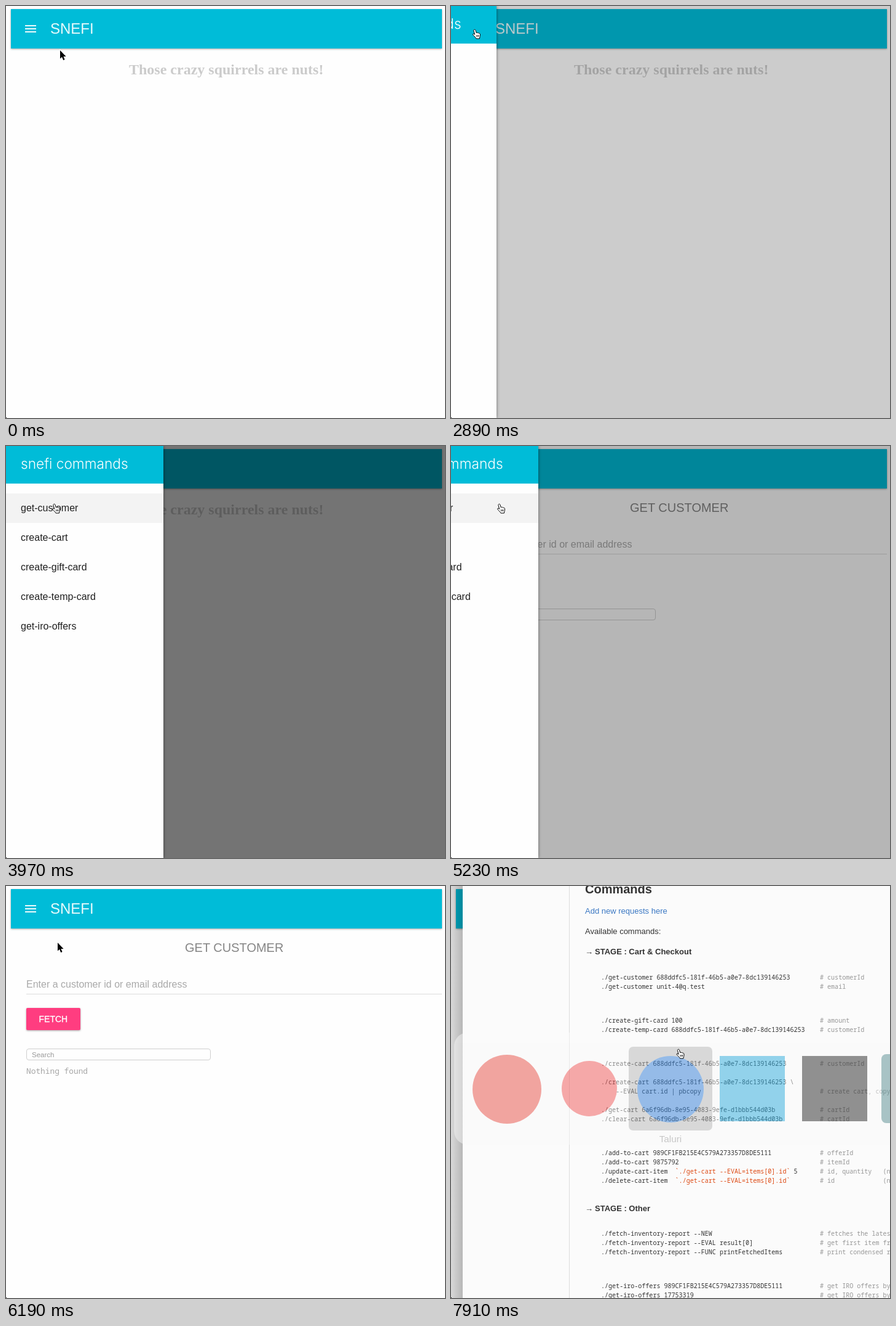
An HTML page for the animation above (8 s loop, 714 by 669 pixels).

```html
<!DOCTYPE html>
<html lang="en">
<head>
<meta charset="utf-8">
<title>Command menu</title>
<style>
  html, body { margin: 0; width: 100%; height: 100%; overflow: hidden; background: #fefefe; }
  svg { display: block; width: 714px; height: 669px; }
  text { white-space: pre; font-family: "Liberation Sans", Arial, sans-serif; }
  .serif { font-family: "Liberation Serif", Times, serif; font-weight: bold; }
  .light { font-family: Inter, sans-serif; font-weight: 300; }
  .mono { font-family: "Noto Sans Mono", monospace; }
  .bold { font-weight: bold; }
  .bar { filter: drop-shadow(0 1px 1.5px rgba(0,0,0,.35)); }
  .side { filter: drop-shadow(0 0 2.5px rgba(0,0,0,.5)); }
</style>
</head>
<body>
<svg id="stage" viewBox="0 0 714 669"></svg>
<script>
const LOOP = 8000, TEAL = '#00bcd8', DRAWER = 256;

const rect = (x, y, w, h, fill, more = '') =>
  `<rect x="${x}" y="${y}" width="${w}" height="${h}" fill="${fill}" ${more}/>`;
const circle = (x, y, r, fill) => `<circle cx="${x}" cy="${y}" r="${r}" fill="${fill}"/>`;
const text = (x, y, size, fill, str, cls = '', more = '') =>
  `<text x="${x}" y="${y}" font-size="${size}" fill="${fill}" class="${cls}" ${more}>${str}</text>`;
const group = (id, body) => `<g id="${id}">${body}</g>`;

const header = rect(8, 5, 701, 64, TEAL, 'class="bar"') +
  [31, 36, 41].map(y => rect(31, y, 18, 2, '#e9fafc')).join('') +
  text(72, 45, 24, '#e9fafc', 'SNEFI');

const home = text(200, 111, 24, '#cbcbcb', 'Those crazy squirrels are nuts!', 'serif');

const form =
  text(291, 107, 20, '#868686', 'GET CUSTOMER') +
  text(33, 165, 16, '#a9a9a9', 'Enter a customer id or email address') +
  rect(33, 175, 676, 1, '#dcdcdc') +
  rect(33, 198, 88, 36, '#ff3d80', 'rx="2" class="bar"') +
  text(53.5, 221, 14, '#fff', 'FETCH', '', 'stroke="#fff" stroke-width=".35"') +
  rect(33.5, 264.5, 299, 18, 'none', 'rx="3.5" stroke="#cfcfcf"') +
  text(42, 278, 11.5, '#999', 'Search') +
  text(33, 305, 12.83, '#a6a6a6', 'Nothing found', 'mono', 'font-weight="500"');

const commands = ['get-customer', 'create-cart', 'create-gift-card', 'create-temp-card', 'get-iro-offers'];
const drawer = rect(0, 0, DRAWER, 669, '#fefefe', 'class="side"') +
  rect(0, 0, DRAWER, 61, TEAL) +
  text(24, 37, 22.7, '#fff', 'snefi commands', 'light') +
  rect(0, 77, DRAWER, 48, '#f3f3f3', 'id="hover"') +
  commands.map((c, i) => text(24, 106 + 48 * i, 16, '#212121', c)).join('');

const customer = '688ddfc5-181f-46b5-a0e7-8dc139146253';
const cart = '6a6f96db-8e95-4083-9efe-d1bbb544d03b';
const offer = '989CF1FB215E4C579A273357D8DE5111';
const item = '<tspan fill="#dd4a14">`./get-cart --EVAL=items[0].id`</tspan>';
const listing = [
  [152, `./get-customer ${customer}`, 'customerId'],
  [167, './get-customer unit-4@q.test', 'email'],
  [222, './create-gift-card 100', 'amount'],
  [237, `./create-temp-card ${customer}`, 'customerId'],
  [292, `./create-cart ${customer}`, 'customerId'],
  [322, `./create-cart ${customer} \\`, ''],
  [337, '    --EVAL cart.id | pbcopy', 'create cart, copy id'],
  [367, `./get-cart ${cart}`, 'cartId'],
  [382, `./clear-cart ${cart}`, 'cartId'],
  [437, `./add-to-cart ${offer}`, 'offerId'],
  [452, './add-to-cart 9875792', 'itemId'],
  [467, `./update-cart-item  ${item} 5`, 'id, quantity   (note'],
  [482, `./delete-cart-item  ${item}`, 'id             (note'],
  [568, './fetch-inventory-report --NEW', 'fetches the latest'],
  [583, './fetch-inventory-report --EVAL result[0]', 'get first item from'],
  [598, './fetch-inventory-report --FUNC printFetchedItems', 'print condensed report'],
  [653, `./get-iro-offers ${offer}`, 'get IRO offers by'],
  [668, './get-iro-offers 17753319', 'get IRO offers by']
];
const stage = (y, name) => text(218, y, 13, '#333', '→') + text(234, y, 13, '#333', 'STAGE : ' + name, 'bold');
const docs =
  `<linearGradient id="shade"><stop stop-opacity=".15"/><stop offset="1" stop-opacity=".28"/></linearGradient>` +
  rect(0, 0, 19, 669, 'url(#shade)', 'id="shadow"') +
  rect(19, 0, 695, 669, '#fbfbfb') +
  rect(192, 0, 1, 669, '#dcdcdc') +
  text(218, 12, 20, '#333', 'Commands', 'bold') +
  text(218, 45, 13, '#3b78c3', 'Add new requests here') +
  text(218, 78, 13, '#333', 'Available commands:') +
  stage(111, 'Cart &amp; Checkout') + stage(528, 'Other') +
  listing.map(([y, code, note]) => text(244, y, 10.06, '#333', code, 'mono') +
    (note && text(600, y, 10.06, '#979797', '# ' + note, 'mono'))).join('');

const switcher =
  rect(5, 238, 760, 182, '#fafafa', 'rx="22" fill-opacity=".85"') +
  rect(0, 261, 136, 136, '#000', 'id="pick" rx="7" fill-opacity=".25"') +
  text(0, 416, 15.3, '#999', '', '', 'id="label" text-anchor="middle"') +
  circle(91, 330, 56, '#e9584f') +
  circle(225, 329, 45, '#f06060') +
  circle(357, 330, 54, '#3b84d8') +
  rect(437, 276, 106, 106, '#36aede') +
  rect(571, 276, 106, 106, '#333') +
  rect(700, 273, 112, 112, '#5f9296', 'rx="8"');

const arrow = `<path d="M0 0V13.6L3 10.8L5.2 16L7.6 15L5.4 10H9.6Z" stroke="#fff" stroke-width="1.6" paint-order="stroke"/>`;
const hand = `<g transform="translate(-4 -1)" stroke="#000" fill="#fff">
  <path d="M3.2 1.5c1-.8 2 0 2.3 1l1.2 4.2c.6-.8 1.8-.6 2.2.2.7-.6 1.8-.3 2.1.5.9-.3 1.8.2 1.9 1.2.1 2 .2 3.4-.6 5.2l-.4 2.2H6.6C5.5 14 3.5 12.2 1.6 10.2.4 9 1.4 7.8 2.8 8.3l1.4 1L2.5 3.4c-.3-.9 0-1.6.7-1.9z"/>
  <path d="M6.8 10.2l.5 3M8.7 10l.4 3M10.5 10l.2 3" stroke-width=".8"/></g>`;

document.getElementById('stage').innerHTML =
  rect(0, 0, 714, 669, '#fefefe') + header + group('home', home) + group('form', form) +
  rect(0, 0, 714, 669, '#000', 'id="overlay"') +
  group('drawer', drawer) + group('docs', docs) + group('switcher', switcher) +
  rect(0, 668, 1, 1, '#000') +
  group('cursor', group('arrow', arrow) + group('hand', hand));

const el = {};
document.querySelectorAll('[id]').forEach(node => el[node.id] = node);
const show = (node, on) => node.setAttribute('display', on ? 'inline' : 'none');

// time, share of the drawer that is open, darkness of the page
const slide = [
  [0, 0, 0],
  [2890, .289, .195], [2940, .63, .39], [3030, .912, .51], [3110, .98, .535], [3200, .997, .54], [3290, 1, .54],
  [5230, .555, .287], [5290, .23, .11], [5380, .053, .02], [5470, 0, 0]
];

// Each move follows a quadratic curve from its first visible step to its last.
const moves = [
  { start: 0, end: 50, steps: 2, path: [[88, 72], [87, 71], [86, 70]], pointer: () => false },
  { start: 500, end: 1030, steps: 9, path: [[83, 68], [62, 52], [38.5, 38]], pointer: (x, y) => x < 56 },
  { start: 3560, end: 3970, steps: 6, path: [[36, 46], [8, 66], [78.5, 94]], pointer: (x, y) => y > 77 },
  { start: 6190, end: 6670, steps: 9, path: [[84, 92], [220, 170], [370, 265]], pointer: () => false }
];

const lastBefore = (list, t, key) => list.filter(e => key(e) <= t).pop();

function cursorAt(t) {
  const m = lastBefore(moves, t, e => e.start);
  const step = Math.min(m.steps - 1, Math.floor((t - m.start) / (m.end - m.start) * (m.steps - 1) + 1e-6));
  const k = step / (m.steps - 1), u = k * k * (3 - 2 * k);
  const [a, b, c] = m.path;
  const [x, y] = [0, 1].map(i => a[i] * (1 - u) ** 2 + 2 * b[i] * u * (1 - u) + c[i] * u * u);
  return { x, y, pointer: m.pointer(x, y) };
}

function render(t) {
  const [, open, dark] = lastBefore(slide, t, e => e[0]);
  show(el.drawer, open > 0);
  el.drawer.setAttribute('transform', `translate(${Math.round(DRAWER * (open - 1))} 0)`);
  el.overlay.setAttribute('opacity', dark);

  show(el.home, t < 5230);
  show(el.form, t >= 5230);

  const fronted = t >= 7850;
  show(el.docs, fronted);
  el.shadow.setAttribute('opacity', t < 7910 ? .7 : 1);

  show(el.switcher, t >= 7080);
  el.switcher.setAttribute('opacity', t < 7850 ? 1 : t < 7910 ? .8 : .53);
  const [center, name] = t < 7650 ? [224, 'Tapreel'] : [357, 'Taluri'];
  el.pick.setAttribute('x', center - 68);
  el.label.setAttribute('x', center);
  el.label.textContent = name;

  const { x, y, pointer } = cursorAt(t);
  const isHand = pointer || t >= 7910;
  show(el.hover, t >= 3560 && y > 77);
  show(el.hand, isHand);
  show(el.arrow, !isHand);
  el.cursor.setAttribute('transform', `translate(${x} ${y})`);
}

const begin = performance.now();
function tick() {
  render((performance.now() - begin) % LOOP);
  requestAnimationFrame(tick);
}
tick();
</script>
</body>
</html>
```
